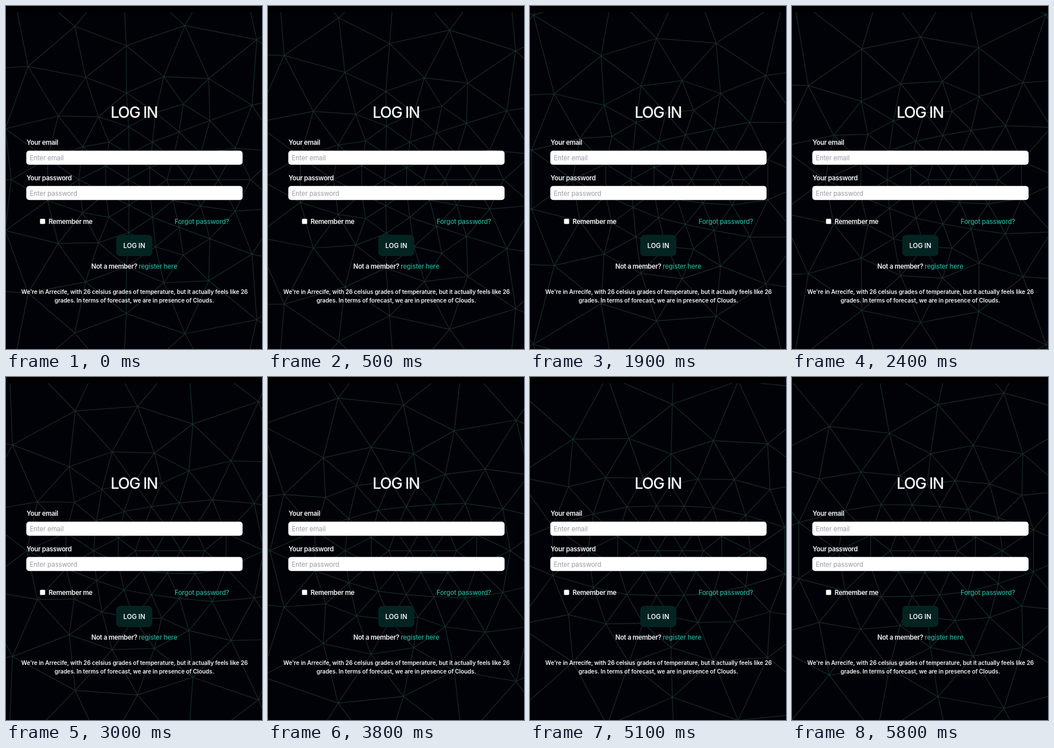
An HTML page for the animation above (5.9 s loop, 448 by 598 pixels).

```html
<!DOCTYPE html>
<html lang="en">
<head>
<meta charset="utf-8">
<title>Log in</title>
<style>
  html, body { margin: 0; width: 100%; height: 100%; overflow: hidden; background: #000; }
  svg { display: block; width: 448px; height: 598px; }
  text { font: 600 11.5px Inter, "Open Sans", sans-serif; letter-spacing: -.32px; fill: #f4f5f6; }
  .title { font-size: 27px; font-weight: 500; letter-spacing: -1.4px; }
  .hint { font-weight: 400; letter-spacing: -.1px; fill: #9b9ca6; }
  .button { letter-spacing: 0; }
  .link { font-weight: 500; letter-spacing: -.18px; fill: #20b096; }
  .note { font-size: 10px; letter-spacing: -.05px; }
  .mid { text-anchor: middle; }
</style>
</head>
<body>
<svg viewBox="0 0 448 598">
  <rect width="448" height="598" fill="#010207"/>
  <path id="mesh" fill="none" stroke="#192c28" stroke-width="1.2"/>
  <rect width="448" height="11" fill="#000"/>

  <text x="36" y="242">Your email</text>
  <rect x="35.5" y="252.3" width="378.5" height="24.4" rx="5" fill="#fff"/>
  <text class="hint" x="41.5" y="269">Enter email</text>

  <text x="36" y="303.5">Your password</text>
  <rect x="35.5" y="313.8" width="378.5" height="24.4" rx="5" fill="#fff"/>
  <text class="hint" x="41.5" y="330.5">Enter password</text>

  <text class="title mid" x="224" y="194.5">LOG IN</text>

  <rect x="59.5" y="371" width="9" height="9" rx="1.5" fill="#fff" stroke="#777" stroke-width=".5"/>
  <text x="74.5" y="380">Remember me</text>
  <text class="link" x="390.5" y="380" text-anchor="end">Forgot password?</text>

  <rect x="193" y="399" width="63" height="37" rx="7" fill="#042422"/>
  <text class="button mid" x="224.5" y="421.5">LOG IN</text>
  <text class="mid" x="224.5" y="457.5">Not a member? <tspan class="link">register here</tspan></text>

  <text class="note mid" x="225" y="501.5">We're in Arrecife, with 26 celsius grades of temperature, but it actually feels like 26</text>
  <text class="note mid" x="224.5" y="516.5">grades. In terms of forecast, we are in presence of Clouds.</text>
</svg>
<script>
const LOOP = 5900, STEP = 100;
const CX = 247.7, CY = 302.8, FOCAL = 204.5, DIST = 0.986, NEAR = 0.02;
const SPLIT = 3;
const mesh = document.getElementById('mesh');

const unit = v => v.map(c => c / Math.hypot(...v));
const dot = (a, b) => a[0] * b[0] + a[1] * b[1] + a[2] * b[2];
const mix = (a, b, k) => a.map((c, i) => c + (b[i] - c) * k);

// Icosahedron corners as [depth, height, side]
const phi = (1 + Math.sqrt(5)) / 2, corners = [];
for (const s of [-1, 1]) for (const t of [-phi, phi])
  corners.push(unit([s, t, 0]), unit([0, s, t]), unit([t, 0, s]));

// Split each face and push the points out to the sphere
const edges = [];
function splitFace(a, b, c) {
  const at = (i, j) => unit(a.map((v, k) =>
    (v * (SPLIT - i - j) + b[k] * i + c[k] * j) / SPLIT));
  for (let i = 0; i < SPLIT; i++)
    for (let j = 0; j < SPLIT - i; j++) {
      const p = at(i, j), q = at(i + 1, j), r = at(i, j + 1);
      edges.push([p, q], [q, r], [r, p]);
    }
}
const adjacent = (a, b) => dot(a, b) > 0.4;
corners.forEach((a, i) => corners.forEach((b, j) => corners.forEach((c, k) => {
  if (i < j && j < k && adjacent(a, b) && adjacent(b, c) && adjacent(a, c)) splitFace(a, b, c);
})));

function project([z, y, x]) {
  return (CX + FOCAL * x / z).toFixed(2) + ' ' + (CY - FOCAL * y / z).toFixed(2);
}

function draw(ms) {
  const angle = (-50.4 + 10.17 * ms / 1000) * Math.PI / 180;
  const cos = Math.cos(angle), sin = Math.sin(angle);
  const turn = ([p, y, q]) => [DIST + p * cos + q * sin, y, q * cos - p * sin];
  let d = '';
  for (const edge of edges) {
    let [a, b] = edge.map(turn);
    if (a[0] < b[0]) [a, b] = [b, a];
    if (a[0] <= NEAR) continue;
    if (b[0] < NEAR) b = mix(a, b, (a[0] - NEAR) / (a[0] - b[0]));
    d += 'M' + project(a) + 'L' + project(b);
  }
  mesh.setAttribute('d', d);
}

const start = performance.now();
function tick() {
  const ms = (performance.now() - start) % LOOP;
  draw(Math.floor(ms / STEP) * STEP);
  requestAnimationFrame(tick);
}
tick();
</script>
</body>
</html>
```
